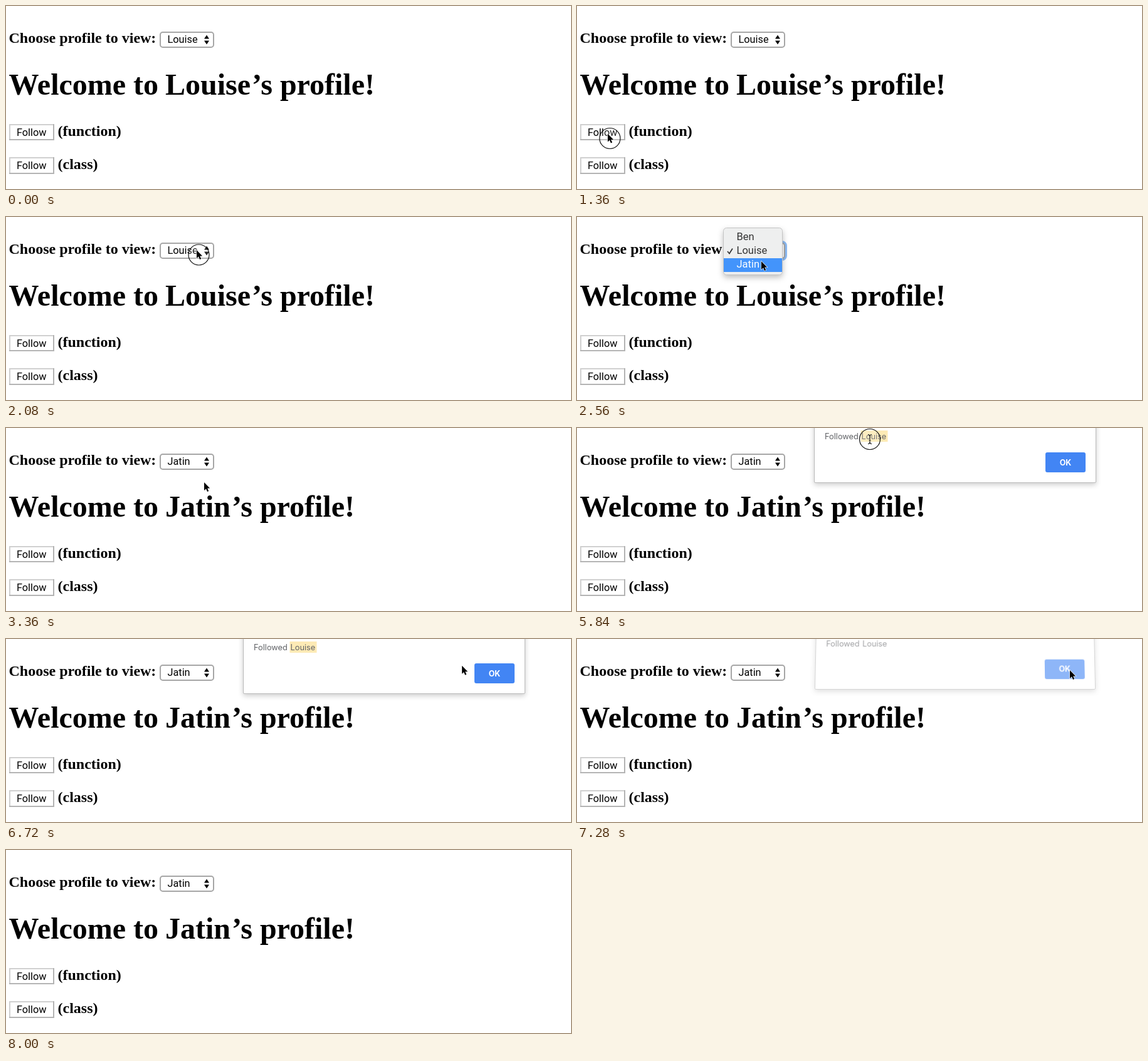
An HTML page for the animation above (8240 ms loop, 901 by 293 pixels).

```html
<!DOCTYPE html>
<html lang="en">
<head>
<meta charset="utf-8">
<title>Profile demo</title>
<style>
  html, body { margin: 0; width: 100%; height: 100%; overflow: hidden; background: #fff; }
  svg { position: absolute; left: 0; top: 0; display: block; overflow: visible; }
  .serif { font: bold 24px "Liberation Serif", "Times New Roman", serif; }
  .title { font-size: 48px; }
  .ui { font: 16.3px Roboto, sans-serif; }
  .menu { font: 16.5px Roboto, sans-serif; fill: #333; }
  #dialog {
    position: absolute; left: 378px; top: -60px; width: 448px; height: 146px;
    background: #fff; border: 1px solid #b9b9b9; border-radius: 2px;
    box-shadow: 0 3px 9px rgba(0, 0, 0, .2);
    transform-origin: 50% 100%;
  }
  #dialog text { font: 12.8px Inter, sans-serif; fill: #606266; }
  #dialog .ok { font-weight: 700; font-size: 12.5px; fill: #fff; }
</style>
</head>
<body>
<svg id="page" width="901" height="293">
  <g class="serif">
    <text x="4.5" y="59">Choose profile to view:</text>
    <g class="title">
      <text x="4.5" y="142">Welcome to</text>
      <text id="titleName" x="254" y="142"></text>
      <text id="titleEnd" y="142">’s profile!</text>
    </g>
    <text x="82.5" y="208">(function)</text>
    <text x="82.5" y="261">(class)</text>
  </g>
  <g class="ui">
    <rect id="focus" x="244" y="40" width="89" height="28" rx="6" fill="none" stroke="#8dbcf5" stroke-width="4"/>
    <rect x="246" y="42" width="85" height="24" rx="4" fill="#fff" stroke="#a6a6a6" stroke-width="2"/>
    <text id="chosen" x="257.5" y="59"></text>
    <path d="M316 52.5l4-6 4 6zM316 55.5l4 6 4-6z"/>
    <g id="buttons"></g>
  </g>
  <g id="menu" class="menu">
    <rect x="233.5" y="17.5" width="94" height="75" rx="5" fill="#eeefef" stroke="#c4c4c4"
      style="filter:drop-shadow(0 4px 5px rgba(0,0,0,.25))"/>
    <rect id="hover" x="234" width="93" height="22" fill="#4394fb"/>
    <g id="items"></g>
    <path id="check" d="M240 55l3 3.5 5-8" fill="none" stroke-width="1.7"/>
  </g>
</svg>

<div id="dialog">
  <svg width="448" height="146" viewBox="379 -59 448 146">
    <rect id="selection" x="452.5" y="4" width="43" height="18" fill="#fdeab5"/>
    <text x="395" y="18">Followed</text>
    <text id="followed" x="453.5" y="18"></text>
    <rect id="ok" x="747" y="39" width="64" height="32" rx="3"/>
    <text class="ok" x="779" y="59.5" text-anchor="middle">OK</text>
  </svg>
</div>

<svg width="901" height="293">
  <g id="cursor">
    <circle id="ring" cx="3.5" cy="7.5" r="16.5" fill="#fff" fill-opacity=".15" stroke="#111" stroke-width="1.2"/>
    <path id="arrow" d="M0 0V13L3 10.3 5 15 7.2 14 5.2 9.5H9.2Z" stroke="#fff" stroke-width="1.2" paint-order="stroke"/>
    <path id="beam" d="M.5 0Q3.5 0 3.5 3V12Q3.5 15 .5 15M6.5 0Q3.5 0 3.5 3M3.5 12Q3.5 15 6.5 15M2 9.5H5" fill="none" stroke="#222" stroke-width="1.1"/>
  </g>
</svg>

<script>
const LOOP = 8240, STEP = 80;
const FIRST = 'Louise', SECOND = 'Jatin';
const names = ['Ben', FIRST, SECOND];
const el = id => document.getElementById(id);
const show = (id, on) => { el(id).style.display = on ? '' : 'none'; };
const within = (t, from, to) => t >= from && t < to;

// Pointer path: time, x, y
const path = [
  [0, 520, 318], [80, 415, 281], [240, 188, 219], [400, 188, 219],
  [640, 27, 208], [720, 27, 208], [1040, 49, 204.5], [1440, 49, 204.5],
  [2000, 304, 53], [2240, 304, 53], [2480, 294, 71], [2960, 294, 71],
  [3360, 316, 87], [4960, 316, 87], [5200, 388, 6], [5280, 388, 6],
  [5520, 463.5, 10.5], [6080, 463.5, 10.5], [6960, 786, 50],
  [7360, 786, 50], [8000, 800, 310], [LOOP, 800, 310]
];
const presses = [[1280, 1520], [2080, 2240], [2640, 2800], [5600, 5680], [5760, 5920], [7120, 7280]];

function pointerAt(t) {
  const i = path.findIndex(p => p[0] > t);
  const [t0, x0, y0] = path[i - 1], [t1, x1, y1] = path[i];
  const k = (t - t0) / (t1 - t0), e = k * k * (3 - 2 * k);
  return [x0 + (x1 - x0) * e, y0 + (y1 - y0) * e];
}

function button(top, bottom) {
  return `
    <rect x="6" y="${top + 1}" width="70" height="${bottom - top - 2}" fill="#fff" stroke="#d0d0d0" stroke-width="2"/>
    <path d="M5 ${bottom - 1}H77M76 ${top}V${bottom}" stroke="#b4b4b4" stroke-width="2"/>
    <text x="17" y="${top + 19}">Follow</text>`;
}

el('buttons').innerHTML = button(189, 215) + button(242, 269);
el('items').innerHTML = names.map((n, i) => `<text x="254.5" y="${37 + 22 * i}">${n}</text>`).join('');
el('followed').textContent = FIRST;

function drawMenu(t) {
  show('menu', within(t, 2160, 3120));
  const active = t < 2400 ? 1 : 2;
  const lit = !within(t, 2800, 2880);
  el('menu').style.opacity = t < 2960 ? 1 : 1 - (t - 2880) / 240;
  el('hover').setAttribute('y', 22 + 22 * active);
  show('hover', lit);
  [...el('items').children].forEach((item, i) => {
    item.style.fill = lit && i === active ? '#fff' : '#333';
  });
  el('check').setAttribute('stroke', lit && active === 1 ? '#fff' : '#333');
}

function drawDialog(t) {
  show('dialog', within(t, 4480, 7440));
  const tilt = t < 4560 ? .5 : t < 7280 ? 0 : t < 7360 ? .4 : .85;
  const style = el('dialog').style;
  style.opacity = 1 - tilt;
  style.transform = tilt ? `translateY(${-17.5 * tilt}px) scale(${1 - tilt * .01}) perspective(1000px) rotateX(${14 * tilt}deg)` : 'none';
  show('selection', within(t, 5760, 7280));
  el('ok').setAttribute('fill', within(t, 7120, 7280) ? '#3b78e7' : '#4285f4');
}

function draw(time) {
  const t = Math.floor(time % LOOP / STEP) * STEP;
  const switched = t >= 2960;
  const name = switched ? SECOND : FIRST;
  el('titleName').textContent = el('chosen').textContent = name;
  el('titleEnd').setAttribute('x', switched ? 360 : 392);
  show('focus', within(t, 2160, 3120));
  drawMenu(t);
  drawDialog(t);

  const [x, y] = pointerAt(t);
  const overText = within(t, 5200, 6320);
  el('cursor').setAttribute('transform', `translate(${x} ${y})`);
  show('cursor', t >= 80 && t < 8000);
  show('ring', presses.some(([a, b]) => within(t, a, b)));
  show('arrow', !overText);
  show('beam', overText);
}

const start = performance.now();
function tick() {
  draw(performance.now() - start);
  requestAnimationFrame(tick);
}
tick();
</script>
</body>
</html>
```
